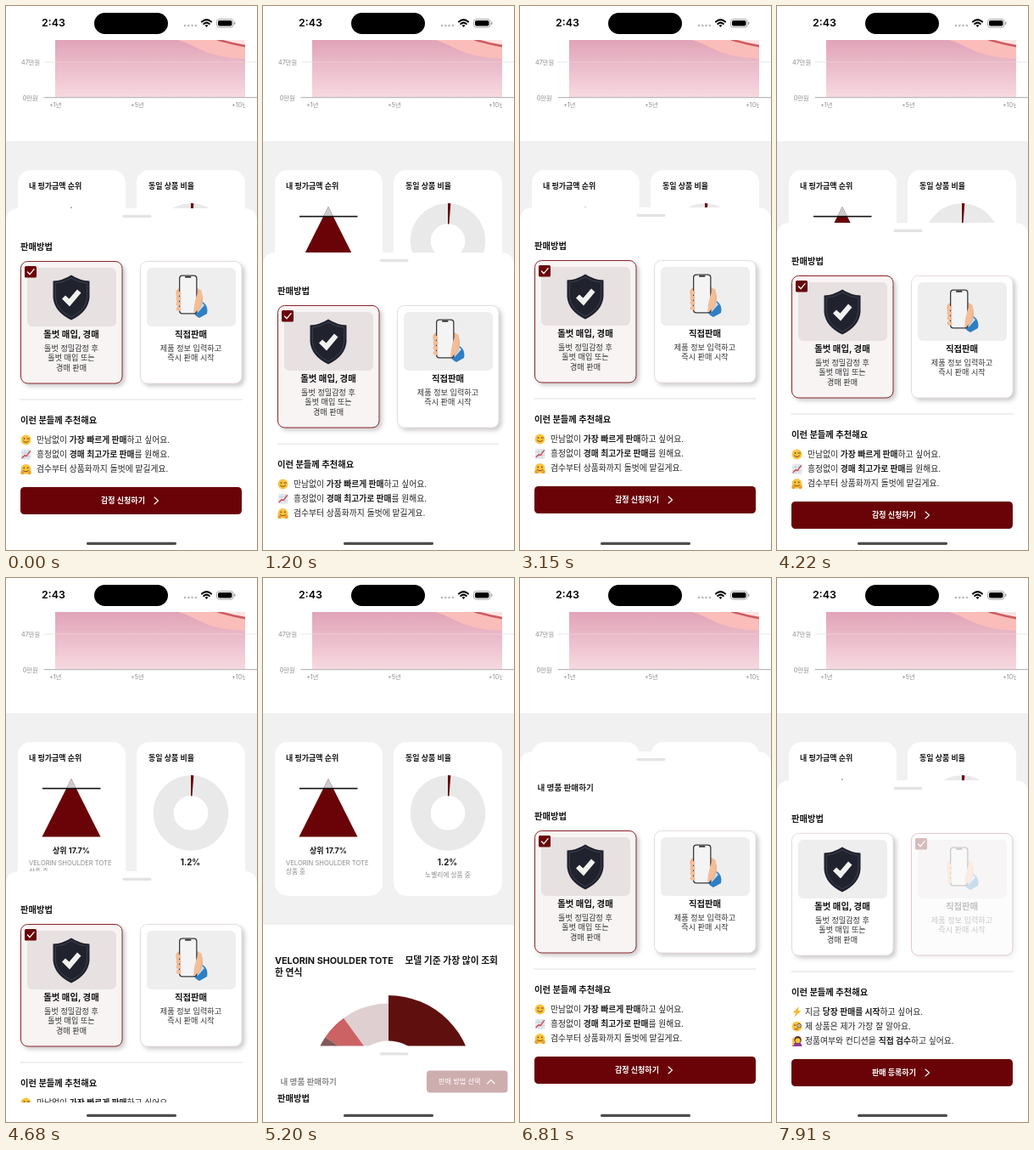
Recreate the animation shown at these times as an HTML page. Size 296x640 px, loop 8000 ms.

```html
<!DOCTYPE html>
<html lang="ko">
<head>
<meta charset="utf-8">
<title>판매방법 시트</title>
<style>
html, body { margin: 0; width: 100%; height: 100%; overflow: hidden; background: #fff; }
svg { display: block; width: 296px; height: 640px; font-family: Inter, "Noto Sans CJK KR", "Noto Sans CJK", sans-serif; }
text { white-space: pre; }
.card { filter: drop-shadow(3px 3px 2.5px rgba(0, 0, 0, .2)); }
</style>
</head>
<body>
<svg id="stage" viewBox="0 0 296 640"></svg>
<script>
const RED = '#690307', INK = '#151515', GRAY = '#8c8c8c', BROWN = '#75441b', SKIN = '#f3bd98';
const OPEN_Y = 283, HEADER = 33, LOOP = 8000, PICK_AT = 7910;

// y is the vertical middle of the line
const text = (x, y, size, str, { w = 400, fill = INK, at = 'start' } = {}) =>
  `<text x="${x}" y="${(y + size * .36).toFixed(2)}" font-size="${size}" font-weight="${w}" fill="${fill}" text-anchor="${at}">${str}</text>`;
const bold = (x, y, size, str, opt) => text(x, y, size, str, { w: 700, ...opt });
const rect = (x, y, w, h, r, fill, more = '') =>
  `<rect x="${x}" y="${y}" width="${w}" height="${h}" rx="${r}" fill="${fill}" ${more}/>`;
const path = (d, fill, more = '') => `<path d="${d}" fill="${fill}" ${more}/>`;
const line = (d, color, width) =>
  path(d, 'none', `stroke="${color}" stroke-width="${width}" stroke-linecap="round" stroke-linejoin="round"`);
const dot = (x, y, r, fill) => `<circle cx="${x}" cy="${y}" r="${r}" fill="${fill}"/>`;

// ring sector, degrees clockwise from twelve o'clock
function sector(cx, cy, r0, r1, from, to, fill) {
  const p = (r, deg) => {
    const a = deg * Math.PI / 180;
    return `${(cx + r * Math.sin(a)).toFixed(2)} ${(cy - r * Math.cos(a)).toFixed(2)}`;
  };
  return path(`M${p(r1, from)}A${r1} ${r1} 0 0 1 ${p(r1, to)}L${p(r0, to)}A${r0} ${r0} 0 0 0 ${p(r0, from)}Z`, fill);
}

const statusBar = () =>
  bold(42, 20, 12.4, '2:43', { w: 600, fill: '#000' }) +
  rect(104, 8, 87, 25, 12.5, '#000') +
  [0, 1, 2, 3].map(i => dot(211 + i * 4.3, 23, 1.3, '#b8b8b8')).join('') +
  line('M231 18.6Q236.5 13.6 242 18.6M233.2 21Q236.5 18.2 239.8 21', '#000', 2) +
  path('M234.6 22.7Q236.5 21.3 238.4 22.7L236.5 24.9Z', '#000') +
  rect(248.5, 15.5, 19.5, 9.6, 3, '#fff', 'stroke="#a5a5a5"') +
  rect(250, 17, 16.5, 6.6, 1.8, '#000') +
  rect(269, 18.6, 1.4, 3.4, .7, '#a5a5a5');

const chart = () =>
  line('M45 66H296', '#e6e6e6', 1) +
  `<g clip-path="url(#plot)">` +
  rect(58, 40, 224, 67, 0, 'url(#pink)') +
  path('M203 40C218 44 226 51 242 56S268 61 282 62V40Z', '#fbbdba') +
  path('M250 40Q265 45 282 47V40Z', '#fbe3e3') +
  line('M250 39.5Q266 44.5 284 47.5', '#cd5c60', 2.6) +
  line('M58 66H282', 'rgba(255,255,255,.25)', 1) +
  text(266, 116, 7.2, '+10년', { fill: GRAY }) + '</g>' +
  line('M45 107.7H296', '#a9a9a9', 1) +
  text(40, 66, 7.2, '47만원', { fill: GRAY, at: 'end' }) +
  text(37.5, 108, 7.2, '0만원', { fill: GRAY, at: 'end' }) +
  text(51, 116, 7.2, '+1년', { fill: GRAY }) +
  text(147, 116, 7.2, '+5년', { fill: GRAY });

const stats = () =>
  rect(0, 159, 296, 249, 0, '#f1f1f1') +
  rect(14, 193, 127, 181, 15, '#fff') +
  rect(154, 193, 128, 181, 15, '#fff') +
  bold(27, 212, 9, '내 평가금액 순위') +
  path('M77 236L111.5 304.5H42.5Z', RED) +
  path('M77 236L82.5 247H71.5Z', '#cbcbcb') +
  rect(43, 246.8, 68.5, 1.6, 0, '#111') +
  bold(77, 320.5, 9, '상위 17.7%', { at: 'middle' }) +
  text(27, 335, 7.6, 'VELORIN SHOULDER TOTE', { fill: GRAY }) +
  text(27, 345, 7.6, '상품 중', { fill: GRAY }) +
  bold(168, 212, 9, '동일 상품 비율') +
  `<circle cx="218" cy="276.5" r="32.25" fill="none" stroke="#e9e9e9" stroke-width="24"/>` +
  sector(218, 276.5, 20, 44.5, 0, 4.3, RED) +
  bold(217.5, 334, 9.8, '1.2%', { at: 'middle' }) +
  text(218, 349, 7.7, '노벨리에 상품 중', { fill: GRAY, at: 'middle' });

const years = () =>
  bold(14, 450, 10.8, 'VELORIN SHOULDER TOTE') +
  bold(277, 450, 10.8, '모델 기준 가장 많이 조회', { at: 'end' }) +
  bold(14, 464, 10.8, '한 연식') +
  sector(148, 590.5, 46, 99.5, 0, 90, '#5f100e') +
  sector(148, 590.5, 46, 90, -36, 0, '#dfcfd0') +
  sector(148, 590.5, 46, 90, -56, -36, '#cb6264') +
  sector(148, 590.5, 46, 90, -75, -56, '#83575a');

const shieldShape = 'M0 -26.5Q10 -20 21.5 -19.5V0Q20 17 0 26.5Q-20 17 -21.5 0V-19.5Q-10 -20 0 -26.5Z';
const shield = () =>
  `<g transform="translate(77 343)">` + path(shieldShape, '#20222e') +
  `<g transform="scale(.87)">${line(shieldShape, '#3e4252', 1.1)}</g>` +
  path('M-11 1.5L-7 -2.5L-2.500 1.5L7 -9.5L11.5 -5.5L-2 10.5Z', '#f1f1ee') + '</g>';

const phoneInHand = () =>
  path('M220 356L232 348Q239 353 237 362L228 367Q221 364 220 356Z', '#2f7fc4') +
  path('M223 356L231 349L234 352L226 361Z', '#bfe0f5') +
  path('M201 342Q199 334 204 332H226Q233 336 232 347Q231 356 224 361H207Q201 356 201 342Z', '#efb58f') +
  rect(204, 316.5, 21.5, 46, 4, '#3a3a3d') +
  rect(205.3, 317.8, 18.9, 43.4, 3, '#f4f4f5') +
  rect(211, 318, 7.5, 1.8, .9, '#3a3a3d') +
  [0, 1, 2, 3].map(i => rect(200.5, 336 + i * 6, 6, 4.8, 2.4, SKIN)).join('') +
  path('M222 352Q224 340 228 334Q231 333 231 338L229 352Q226 360 221 361Z', SKIN);

function card(x, picked, art, title, lines, opacity = 1) {
  const mid = x + 60;
  return `<g class="card" opacity="${opacity}">` +
    rect(x + .5, 300.5, 119.5, 143.5, 8, picked ? '#f8f4f4' : '#fff', `stroke="${picked ? '#8b2429' : '#e6dcdd'}"`) + '</g>' +
    `<g opacity="${opacity}">` +
    rect(x + 8, 308, 105, 69, 6, picked ? '#e8e1e1' : '#efeeee') + art +
    bold(mid, 386.5, 10.4, title, { at: 'middle' }) +
    lines.map((s, i) => text(mid, 402.5 + i * 11.6, 9.15, s, { fill: '#333', at: 'middle' })).join('') +
    (picked ? rect(x + 5, 306, 14, 13.5, 1.5, RED) + line(`M${x + 8.5} 313l2.6 2.7l5 -6`, '#fff', 1.3) : '') +
    '</g>';
}

// small icons around their own centre
const face = features => dot(0, 0, 5.9, '#f9c440') + features;
const eye = x => dot(x, -1.6, .9, BROWN);
const smile = line('M-3 1.5q3 3 6 0', BROWN, 1);
const icons = {
  wink: face(eye(-2) + line('M1.5 -1.5h2.5', BROWN, 1) + smile),
  graph: rect(-5.5, -6, 11.5, 12, 1, '#e4ebf0') +
    line('M-5 -2h10.5M-5 2h10.5M-1.5 -5v10M2.5 -5v10', '#a9bccb', .5) +
    line('M-4.5 4l3 -3l2 1l4.5 -6', '#d5404a', 1.3),
  hug: face(eye(-2.2) + eye(2.2) + smile + dot(-4, 4, 2.3, '#eda02f') + dot(4, 4, 2.3, '#eda02f')),
  bolt: path('M2.5 -6.5L-5 1H-1L-3.5 6.5L5 -1.5H1Z', '#fbb52d'),
  monocle: face(eye(-2.5) + dot(2.5, -1, 2.6, BROWN) + dot(2.5, -1, 1.8, '#fff') + dot(2.5, -1, .8, BROWN) +
    line('M-2.5 3h3.5', BROWN, .9)),
  raise: path('M-5.500 6Q-4.5 1 .5 1T6 6Z', '#8e3a9c') +
    dot(1, -1.5, 4.3, '#53301f') + dot(1, -.6, 3, '#f9c440') + line('M-4.5 4V-3', '#f9c440', 2.2)
};

const strong = s => `<tspan font-weight="700">${s}</tspan>`;

function choice(second) {
  const x = second ? 33 : 36;
  const rows = second ? [
    ['bolt', `지금 ${strong('당장 판매를 시작')}하고 싶어요.`],
    ['monocle', '제 상품은 제가 가장 잘 알아요.'],
    ['raise', `정품여부와 컨디션을 ${strong('직접 검수')}하고 싶어요.`]
  ] : [
    ['wink', `만남없이 ${strong('가장 빠르게 판매')}하고 싶어요.`],
    ['graph', `흥정없이 ${strong('경매 최고가로 판매')}를 원해요.`],
    ['hug', '검수부터 상품화까지 돌벗에 맡길게요.']
  ];
  return card(17, !second, shield(), '돌벗 매입, 경매', ['돌벗 정밀감정 후', '돌벗 매입 또는', '경매 판매']) +
    card(158, second, phoneInHand(), '직접판매', ['제품 정보 입력하고', '즉시 판매 시작'], second ? .25 : 1) +
    rows.map(([icon, str], i) => {
      const y = 510.5 + i * 17.2;
      return `<g transform="translate(23.5 ${y})">${icons[icon]}</g>` + text(x, y, 9.8, str, { fill: '#222' });
    }).join('') +
    rect(17, 566, 261, 32, 4.5, RED) +
    bold(138, 582, 9, second ? '판매 등록하기' : '감정 신청하기', { fill: '#fff', at: 'middle' }) +
    line('M175 578l4.5 4l-4.5 4', '#fff', 1.1);
}

const group = (id, content) => `<g id="${id}">${content}</g>`;

const sheetTop = () =>
  path('M0 16Q0 0 16 0H280Q296 0 296 16V640H0Z', '#fff') +
  rect(137.5, 7.7, 34, 3.4, 1.7, '#e3e3e3') +
  group('head', bold(20.5, 42, 9.6, '내 명품 판매하기')) +
  group('pick', rect(193, 29, 95.5, 26, 4, RED) +
    text(207, 42, 8.2, '판매 방법 선택', { fill: '#fff', w: 500 }) +
    line('M264.5 44.3l4.3 -4.5l4.3 4.5', '#fff', 1.2));

const sheetBody = () =>
  bold(17, 283, 10.3, '판매방법') +
  line('M17 463H278', '#dedede', 1) +
  bold(17, 487.5, 10.3, '이런 분들께 추천해요') +
  group('first', choice(false)) + group('second', choice(true));

const el = id => document.getElementById(id);
el('stage').innerHTML =
  `<defs>
    <linearGradient id="pink" x2="0" y2="1"><stop stop-color="#e0a3b7"/><stop offset="1" stop-color="#f7d9e0"/></linearGradient>
    <clipPath id="plot"><path d="M45 40H282V125H45Z"/></clipPath>
  </defs>` +
  rect(0, 0, 296, 640, 0, '#fff') +
  chart() + stats() + years() + statusBar() +
  group('top', sheetTop()) + group('body', sheetBody()) +
  rect(0, 617, 296, 23, 0, '#fff') +
  rect(95, 630.7, 106, 3.3, 1.6, '#4d4d4d');

// start, time per step, then the body's y at each step
const moves = [
  [0, 100, OPEN_Y],
  [1200, 112, 335, 480, 600, 626, 625],
  [2700, 112, 560, 400, 283, 278, 282, 283],
  [4220, 110, 300, 335, 365],
  [4680, 105, 390, 425, 490, 565, 612, 627, 625],
  [6170, 110, 615, 580, 530],
  [6710, 100, 400, 280, 276, 280, 282, 283]
];

// start, duration, end value
const headerFades = [[1340, 220, 1], [2900, 240, 0], [4950, 300, 1], [6790, 300, 0]];
const pickFades = [[1380, 260, 1], [2650, 150, 0], [5010, 280, 1], [6660, 130, 0]];

function fadeAt(fades, t) {
  const now = fades.findLast(f => f[0] <= t);
  if (!now) return 0;
  const [from, length, end] = now;
  const k = Math.min(1, (t - from) / length);
  return end ? k : 1 - k;
}

const parts = Object.fromEntries(['top', 'head', 'pick', 'body', 'first', 'second'].map(id => [id, el(id)]));
const begin = performance.now();

function draw() {
  const t = (performance.now() - begin) % LOOP;
  const [from, gap, ...ys] = moves.findLast(m => m[0] <= t);
  const i = Math.min(ys.length - 1, Math.floor((t - from) / gap));
  const held = from + i * gap;
  const y = ys[i], reveal = fadeAt(headerFades, held);
  parts.top.setAttribute('transform', `translate(0 ${y - 45 - HEADER * reveal})`);
  parts.body.setAttribute('transform', `translate(0 ${y - OPEN_Y})`);
  parts.head.setAttribute('opacity', reveal);
  parts.pick.setAttribute('opacity', fadeAt(pickFades, held));
  parts.first.style.display = t < PICK_AT ? '' : 'none';
  parts.second.style.display = t < PICK_AT ? 'none' : '';
  requestAnimationFrame(draw);
}
draw();
</script>
</body>
</html>
```
